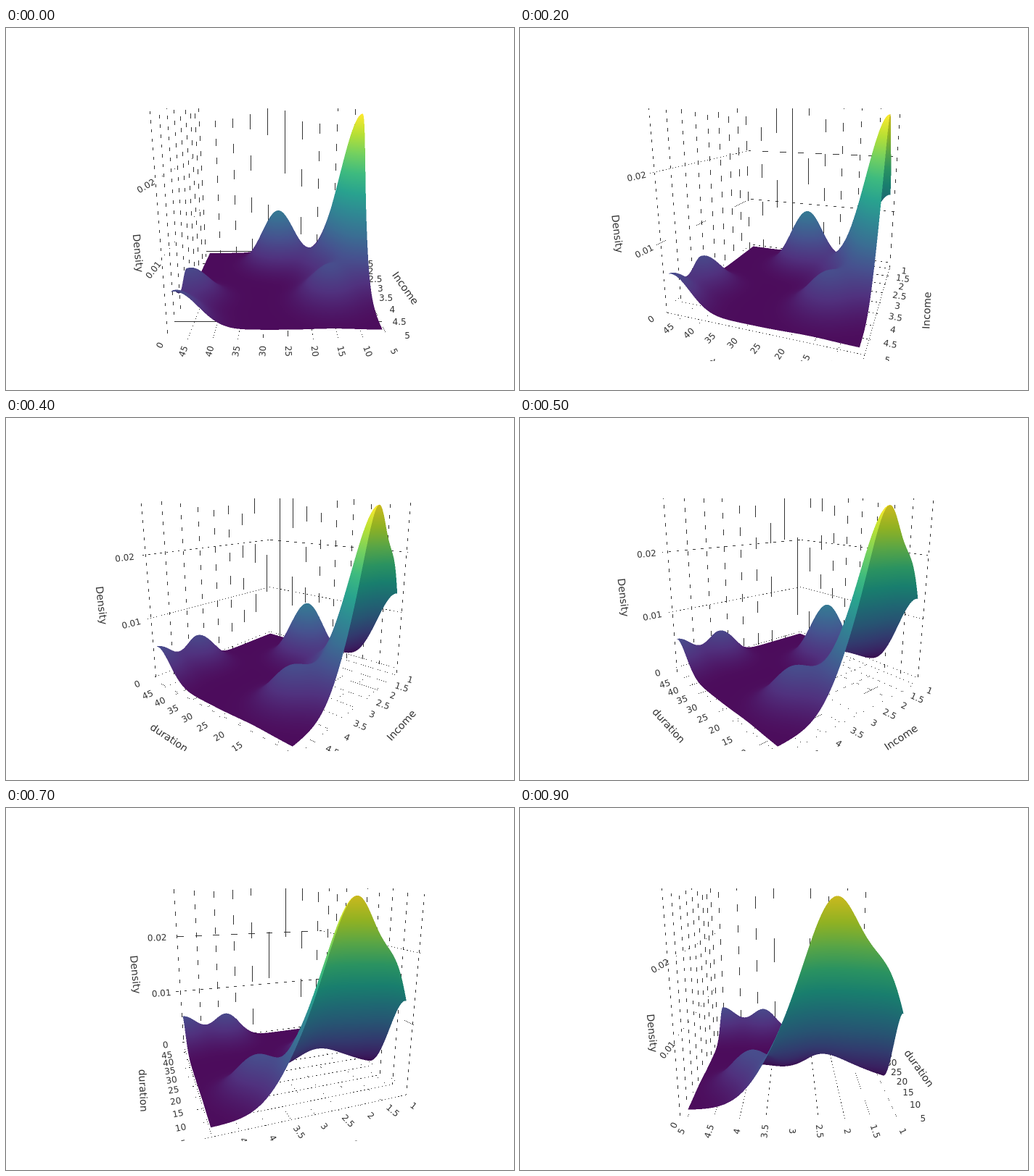
Write an HTML page with a canvas that moves like this. It is 700x500 px and loops after 1000 ms.

```html
<!DOCTYPE html>
<html lang="en">
<head>
<meta charset="utf-8">
<title>Density surface</title>
<style>
html, body { margin: 0; width: 100%; height: 100%; overflow: hidden; background: #fff; }
canvas { display: block; width: 700px; height: 500px; }
</style>
</head>
<body>
<canvas id="stage" width="700" height="500"></canvas>
<script>
const W = 700, H = 500, STEPS = 10, STEP_MS = 100;
const FONT = '"DejaVu Sans", Verdana, sans-serif';
const INK = '#333';
const PEAK = 0.0274;       // highest density
const HALF = 16 / 34;      // data half size inside the unit box
const TICK_GAP = 0.0856, TITLE_GAP = 0.229;

// Camera circling at a fixed height
const DIST = Math.hypot(2, 0.5), SIN = 0.5 / DIST, COS = 2 / DIST;
const FOCAL = 217.5 / Math.tan(Math.PI / 8);
const CX = 375, CY = 242.5;

function camera(az) {
  const c = Math.cos(az), s = Math.sin(az);
  return ([x, y, z]) => {
    const near = x * c + y * s, side = y * c - x * s;
    const inv = 1 / (DIST - near * COS - z * SIN);
    return [CX + side * FOCAL * inv, CY - (z * COS - near * SIN) * FOCAL * inv, inv];
  };
}

// Data to box coordinates
const durX = d => (d - 27) / 21 * HALF;
const incY = i => (i - 3) / 2 * HALF;
const denZ = w => (w * 2 - 1) * HALF;

const range = (a, b, step) =>
  Array.from({ length: Math.round((b - a) / step) + 1 }, (_, i) => a + i * step);
const durTicks = range(5, 45, 5), incTicks = range(1, 5, 0.5), denTicks = [0, 0.01, 0.02];

// Bumps: height, duration, income, spread of each
const BUMPS = [
  [0.88, 6, 2.22, 5.1, 0.5],
  [0.525, 6, 1.25, 4.9, 0.42],
  [0.305, 6, 3.07, 5.1, 0.53],
  [0.38, 27, 1.85, 4.5, 0.42],
  [0.09, 18, 2.6, 3.5, 0.42],
  [0.19, 15.8, 3.88, 4.2, 0.43],
  [0.187, 47, 3.82, 4.3, 0.37],
  [0.2, 47.3, 5, 4.5, 0.41]
];
function density(d, i) {
  let w = 0;
  for (const [h, md, mi, sd, si] of BUMPS)
    w += h * Math.exp(-(((d - md) / sd) ** 2 + ((i - mi) / si) ** 2) / 2);
  return w;
}

const N = 130;
const mesh = [];
for (let a = 0; a <= N; a++)
  for (let b = 0; b <= N; b++) {
    const d = 6 + 42 * a / N, i = 1 + 4 * b / N, w = density(d, i);
    mesh.push({ at: [durX(d), incY(i), denZ(w)], w });
  }

// Colour scale, lit top side and shaded underside
const SCALE = ['440154', '482878', '3e4989', '31688e', '26828e',
  '1f9e89', '35b779', '6ece58', 'b5de2b', 'fde725']
  .map(h => [0, 2, 4].map(k => parseInt(h.slice(k, k + 2), 16)));
function colour(w, gain, lift) {
  const p = w * (SCALE.length - 1), k = Math.min(Math.floor(p), SCALE.length - 2);
  const [r, g, b] = SCALE[k].map((v, n) =>
    Math.min(255, Math.round((v + (SCALE[k + 1][n] - v) * (p - k)) * gain + lift)));
  return (255 << 24 | b << 16 | g << 8 | r) >>> 0;
}
const ramp = (gain, lift) => Uint32Array.from({ length: 512 }, (_, n) => colour(n / 511, gain, lift));
const TOP = ramp(0.96, 11), UNDER = ramp(0.8, 0);

// Depth-buffered surface at double size
const SS = 2, BW = W * SS, BH = H * SS;
const depth = new Float32Array(BW * BH);
const buffer = document.createElement('canvas');
buffer.width = BW;
buffer.height = BH;
const bufCtx = buffer.getContext('2d');
const image = bufCtx.createImageData(BW, BH);
const pixels = new Uint32Array(image.data.buffer);

function triangle(p, q, r) {
  const ux = q.x - p.x, uy = q.y - p.y, vx = r.x - p.x, vy = r.y - p.y;
  const area = ux * vy - uy * vx;
  if (!area) return;
  const lut = area < 0 ? TOP : UNDER;
  const x0 = Math.max(0, Math.ceil(Math.min(p.x, q.x, r.x) - 0.5));
  const x1 = Math.min(BW - 1, Math.floor(Math.max(p.x, q.x, r.x) - 0.5));
  const y0 = Math.max(0, Math.ceil(Math.min(p.y, q.y, r.y) - 0.5));
  const y1 = Math.min(BH - 1, Math.floor(Math.max(p.y, q.y, r.y) - 0.5));
  for (let y = y0; y <= y1; y++)
    for (let x = x0; x <= x1; x++) {
      const dx = x + 0.5 - p.x, dy = y + 0.5 - p.y;
      const b = (dx * vy - dy * vx) / area, c = (ux * dy - uy * dx) / area;
      if (b < -1e-6 || c < -1e-6 || b + c > 1.000001) continue;
      const inv = p.inv + b * (q.inv - p.inv) + c * (r.inv - p.inv);
      const at = y * BW + x;
      if (inv <= depth[at]) continue;
      depth[at] = inv;
      const w = p.w + b * (q.w - p.w) + c * (r.w - p.w);
      pixels[at] = lut[Math.max(0, Math.min(511, Math.round(w * 511)))];
    }
}

function drawSurface(ctx, project) {
  depth.fill(0);
  pixels.fill(0);
  const pts = mesh.map(m => {
    const [x, y, inv] = project(m.at);
    return { x: x * SS, y: y * SS, inv, w: m.w };
  });
  for (let a = 0; a < N; a++)
    for (let b = 0; b < N; b++) {
      const k = a * (N + 1) + b;
      triangle(pts[k], pts[k + N + 1], pts[k + 1]);
      triangle(pts[k + 1], pts[k + N + 1], pts[k + N + 2]);
    }
  bufCtx.putImageData(image, 0, 0);
  ctx.drawImage(buffer, 0, 0, W, H);
}

// Hairline that shows only where it falls close to a pixel centre, less so when oblique
function hairline(ctx, [x0, y0], [x1, y1]) {
  const steep = Math.abs(y1 - y0) > Math.abs(x1 - x0);
  let [a0, b0, a1, b1] = steep ? [y0, x0, y1, x1] : [x0, y0, x1, y1];
  if (a0 > a1) [a0, b0, a1, b1] = [a1, b1, a0, b0];
  const slope = (b1 - b0) / (a1 - a0);
  const reach = Math.max(0.04, 0.19 - 0.25 * Math.abs(slope));
  for (let a = Math.ceil(a0 - 0.5); a + 0.5 <= a1; a++) {
    const b = b0 + slope * (a + 0.5 - a0);
    const cell = Math.floor(b);
    if (Math.abs(b - cell - 0.5) > reach) continue;
    if (steep) ctx.fillRect(cell, a, 1, 1);
    else ctx.fillRect(a, cell, 1, 1);
  }
}

function drawGrid(ctx, project, wallX, wallY) {
  const line = (p, q) => hairline(ctx, project(p), project(q));
  for (const x of durTicks.map(durX)) {
    line([x, wallY, -0.5], [x, wallY, 0.5]);
    line([x, -0.5, -0.5], [x, 0.5, -0.5]);
  }
  for (const y of incTicks.map(incY)) {
    line([wallX, y, -0.5], [wallX, y, 0.5]);
    line([-0.5, y, -0.5], [0.5, y, -0.5]);
  }
  for (const z of denTicks.map(d => denZ(d / PEAK))) {
    line([wallX, -0.5, z], [wallX, 0.5, z]);
    line([-0.5, wallY, z], [0.5, wallY, z]);
  }
}

const shift = (p, dir, by) => p.map((v, k) => v + dir[k] * by);

// Text centred on its ink at a point, turned along a direction in space
function label(ctx, project, text, at, dir, size) {
  const [x, y] = project(at);
  const [xa, ya] = project(shift(at, dir, -0.05));
  const [xb, yb] = project(shift(at, dir, 0.05));
  let turn = Math.atan2(yb - ya, xb - xa);
  if (turn > Math.PI / 2) turn -= Math.PI;
  if (turn <= -Math.PI / 2) turn += Math.PI;
  ctx.save();
  ctx.translate(x, y);
  ctx.rotate(turn);
  ctx.font = size + 'px ' + FONT;
  const ink = ctx.measureText(text);
  ctx.fillText(text, 0, (ink.actualBoundingBoxAscent - ink.actualBoundingBoxDescent) / 2);
  ctx.restore();
}

function drawAxis(ctx, project, title, ticks, place, out, along) {
  for (const [text, v] of ticks)
    label(ctx, project, text, shift(place(v), out, TICK_GAP), out, 12);
  label(ctx, project, title, shift(place(0), out, TITLE_GAP), along, 14);
}

function render(step) {
  const canvas = document.createElement('canvas');
  canvas.width = W;
  canvas.height = H;
  const ctx = canvas.getContext('2d');
  const project = camera((90 + step * 10) * Math.PI / 180);
  const last = step === STEPS - 1;
  const wallX = 0.5, wallY = last ? 0.5 : -0.5;

  ctx.fillStyle = '#fff';
  ctx.fillRect(0, 0, W, H);
  ctx.beginPath();
  ctx.rect(60, 111, 630, 349);
  ctx.clip();
  ctx.fillStyle = INK;
  ctx.textAlign = 'center';
  ctx.textBaseline = 'alphabetic';

  drawGrid(ctx, project, wallX, wallY);
  drawAxis(ctx, project, 'duration', durTicks.map(d => [String(d), durX(d)]),
    x => [x, -wallY, -0.5], [0, -Math.sign(wallY), 0], [1, 0, 0]);
  drawAxis(ctx, project, 'Income', incTicks.map(i => [String(i), incY(i)]),
    y => [-wallX, y, -0.5], [-1, 0, 0], [0, 1, 0]);
  drawAxis(ctx, project, 'Density', denTicks.map(d => [String(d), denZ(d / PEAK)]),
    z => [last ? -0.5 : 0.5, 0.5, z], last ? [-1, 0, 0] : [0, 1, 0], [0, 0, 1]);
  drawSurface(ctx, project);
  return canvas;
}

const stage = document.getElementById('stage').getContext('2d');
const views = [];
const start = performance.now();
let shown = -1;

function tick() {
  const t = Math.max(0, performance.now() - start);
  const step = Math.floor(t / STEP_MS) % STEPS;
  if (step !== shown) {
    views[step] = views[step] || render(step);
    stage.drawImage(views[step], 0, 0);
    shown = step;
  }
  requestAnimationFrame(tick);
}
tick();
</script>
</body>
</html>
```
